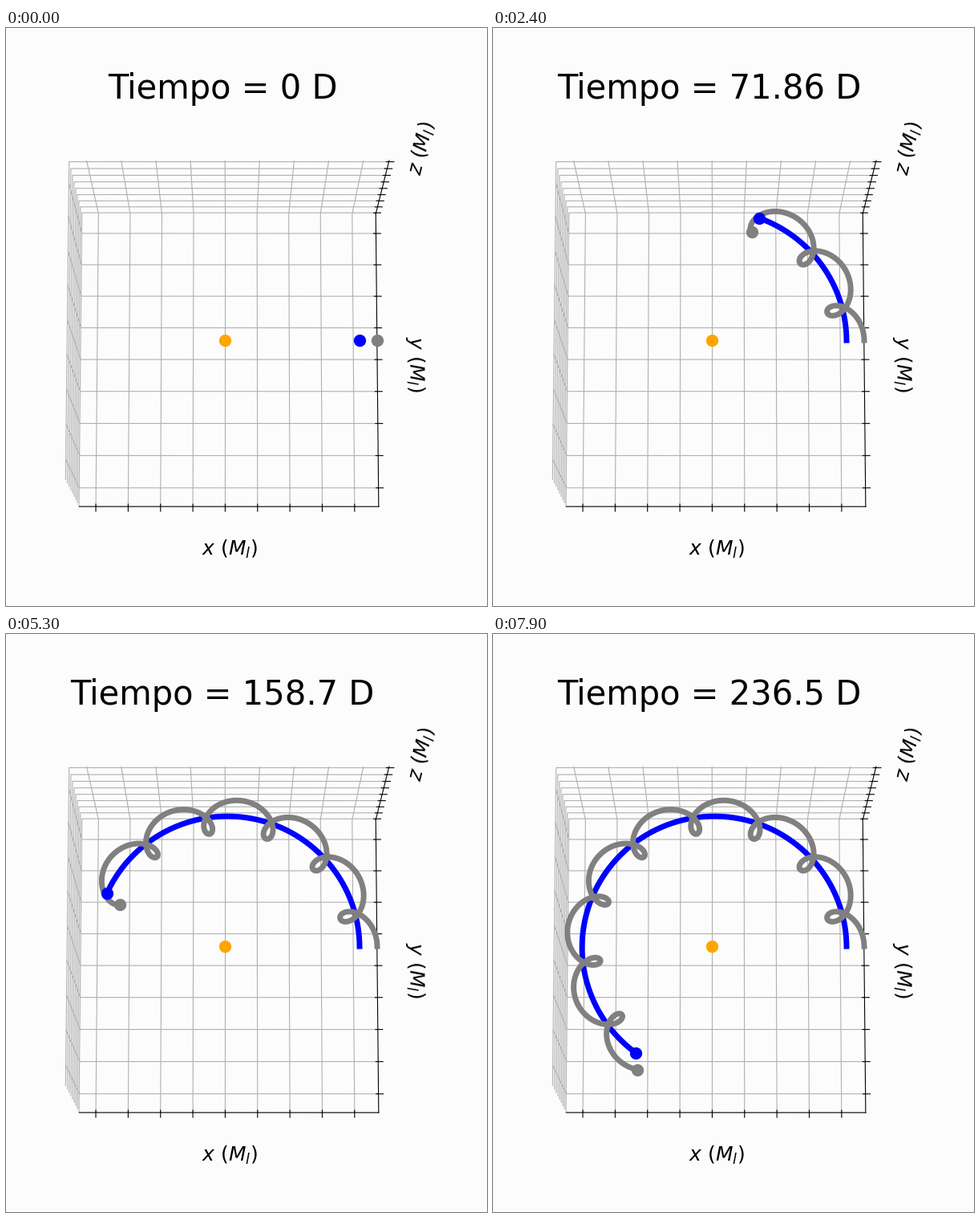
A matplotlib script that plays this animation: 600 px wide and 720 px high, repeating every 8000 ms.

```python
import numpy as np
import matplotlib.pyplot as plt
from matplotlib.animation import FuncAnimation

W, H, DPI = 600, 720, 100
FRAMES, INTERVAL = 80, 100
DAYS_PER_FRAME = 2.99415

# semi-major axis (in grid units), eccentricity, period (days)
EARTH = (3.955, 0.0167, 365.25)
MOON = (0.500, 0.055, 27.03)


def orbit(t, a, ecc, period):
    """Kepler orbit that leaves its far point on the +x side at t = 0."""
    m = np.pi + 2 * np.pi * t / period
    e = m
    for _ in range(8):
        e = m + ecc * np.sin(e)
    x = -a * (np.cos(e) - ecc)
    y = -a * np.sqrt(1 - ecc**2) * np.sin(e)
    return np.array([x, y, np.zeros_like(x)])


fig = plt.figure(figsize=(W / DPI, H / DPI), dpi=DPI, facecolor="#fcfcfc")
ax = fig.add_axes([-0.05, -0.05, 1, 1], projection="3d")
ax.set_facecolor("none")
ax.view_init(elev=80, azim=-89.99)  # just off -90 so the left wall is the far one

ax.set_xlim(0.115 - 4.629, 0.115 + 4.629)
ax.set_ylim(0.026 - 4.604, 0.026 + 4.604)
ax.set_zlim(-25 / 24, 25 / 24)
ax.set_xticks(range(-4, 5))
ax.set_yticks(range(-4, 5))
ax.set_zticks(np.linspace(-1, 1, 9))
for axis in (ax.xaxis, ax.yaxis, ax.zaxis):
    axis.set_ticklabels([])
    axis.pane.set_visible(False)


def label(x, y, text, angle):
    fig.text(x / W, 1 - y / H, text, fontsize=18, rotation=angle,
             ha="center", va="center")


label(278.5, 649.5, "$x$ $(M_l)$", 0)
label(510.5, 419, "$y$ $(M_l)$", -89.4)
label(519.5, 150, "$z$ $(M_l)$", 75.9)
title = fig.text(0.45, 1 - 87.67 / H, "", fontsize=30, ha="center")


def trail(color):
    return ax.plot([], [], [], color=color, lw=5)[0]


def dot(color):
    return ax.plot([0], [0], [0], "o", color=color, ms=10)[0]


trails = [trail("blue"), trail("gray")]
dot("orange")
dots = [dot("blue"), dot("gray")]


def update(i):
    now = i * DAYS_PER_FRAME
    t = np.linspace(0, now, 10 * i + 2)
    earth = orbit(t, *EARTH)
    moon = earth + orbit(t, *MOON)
    for path, line, point in zip((earth, moon), trails, dots):
        line.set_data_3d(*path)
        point.set_data_3d(*path[:, -1:])
    title.set_text(f"Tiempo = {now:.4g} D")
    return [title, *trails, *dots]


anim = FuncAnimation(fig, update, frames=FRAMES, interval=INTERVAL,
                     repeat=True, repeat_delay=0, blit=False)
plt.show()
```
